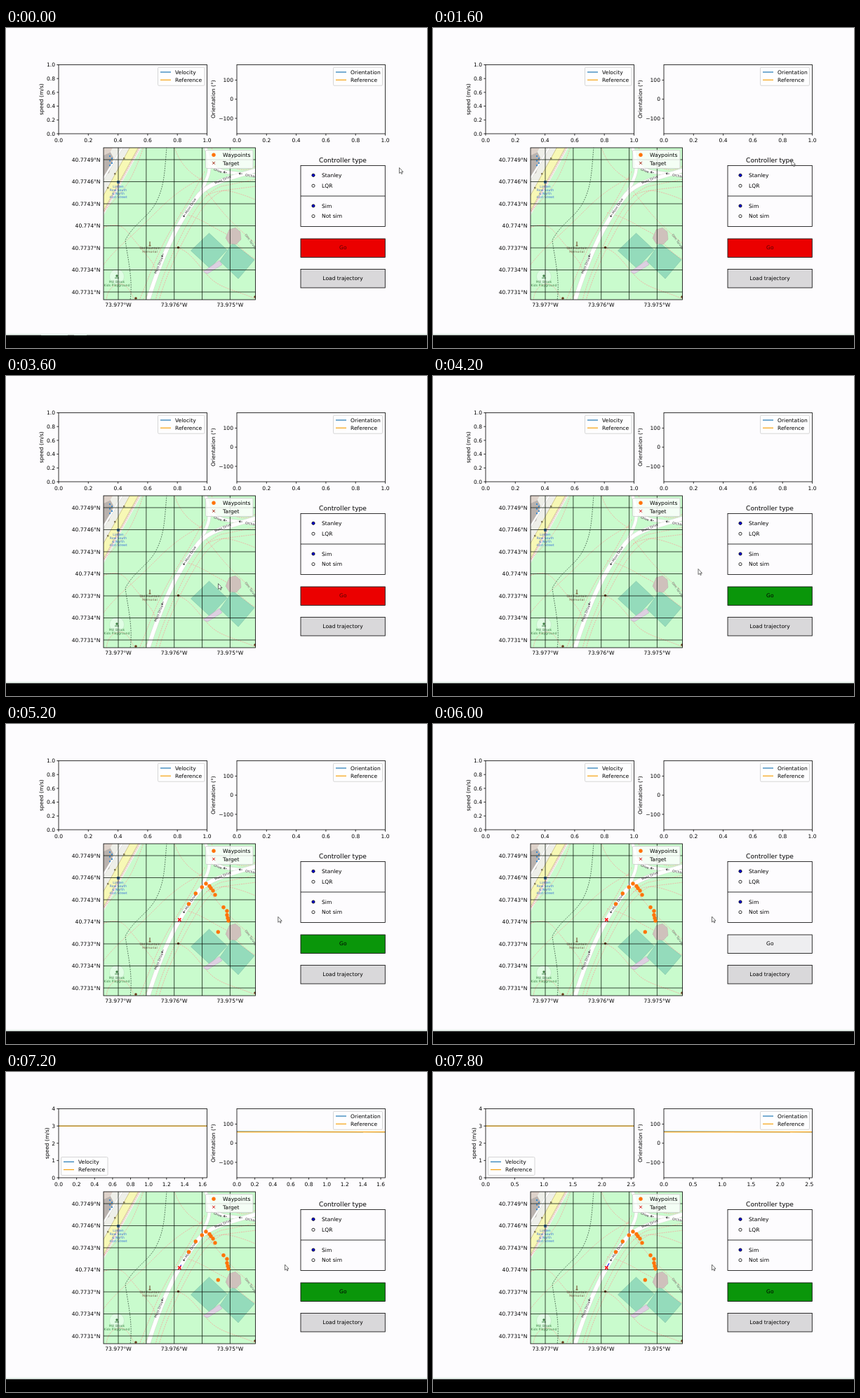
An HTML page that plays this animation: 600x457 px, repeating every 8 s.

```html
<!DOCTYPE html>
<html lang="en">
<head>
<meta charset="utf-8">
<title>Controller dashboard</title>
<style>
html, body { margin: 0; width: 100%; height: 100%; overflow: hidden; background: #fdfcfe; }
svg { display: block; width: 600px; height: 457px; font: 7.57px "DejaVu Sans", sans-serif; }
.tiny { font-size: 4.6px; }
.path { fill: none; stroke: #f4a39b; stroke-width: .8; stroke-dasharray: 2 1.2; }
.road { fill: none; stroke-linejoin: round; }
</style>
</head>
<body>
<svg id="stage" viewBox="0 0 600 457"></svg>
<script>
const LOOP = 8000, STEP = 200;
const BLUE = '#1f77b4', ORANGE = '#f5a00c', WAYPOINT = '#ff740a';
const TOP = 52.5, BOTTOM = 151, WIDTH = 211.5;

const range = (n, f) => Array.from({ length: n }, (_, i) => f(i)).join('');
const line = (x1, y1, x2, y2, stroke = '#000', w = .8) =>
  `<path d="M${x1} ${y1}L${x2} ${y2}" stroke="${stroke}" stroke-width="${w}"/>`;
const box = (x, y, w, h, fill = 'none', extra = 'stroke="#000" stroke-width=".8"') =>
  `<rect x="${x}" y="${y}" width="${w}" height="${h}" fill="${fill}" ${extra}/>`;
const dot = (x, y, r, fill, extra = '') => `<circle cx="${x}" cy="${y}" r="${r}" fill="${fill}" ${extra}/>`;
const text = (x, y, s, anchor = 'start', extra = '') =>
  `<text x="${x}" y="${y}" dy=".365em" text-anchor="${anchor}" ${extra}>${s}</text>`;
const turned = (x, y, angle, s, extra = '') =>
  text(0, 0, s, 'middle', `transform="translate(${x} ${y}) rotate(${angle})" ${extra}`);
const cross = (x, y, r, stroke, w) =>
  `<path d="M${x - r} ${y - r}l${2 * r} ${2 * r}m0 ${-2 * r}l${-2 * r} ${2 * r}" stroke="${stroke}" stroke-width="${w}"/>`;
const legendBox = (x, y, w) =>
  box(x, y, w, 26, '#fff', 'fill-opacity=".8" stroke="#ccc" stroke-width=".8" rx="1.5"');
const legend = (x, y, w, name) => legendBox(x, y, w) +
  line(x + 3.5, y + 6.8, x + 18.5, y + 6.8, BLUE, 1.2) + text(x + 24.5, y + 6.8, name) +
  line(x + 3.5, y + 18, x + 18.5, y + 18, ORANGE, 1.2) + text(x + 24.5, y + 18, 'Reference');

function tickStep(max) {
  const raw = max / 9 - 1e-9, power = 10 ** Math.floor(Math.log10(raw));
  return [1, 2, 2.5, 5, 10].map(k => k * power).find(s => s >= raw);
}

function axes(x, xMax, yTicks) {
  const step = tickStep(xMax);
  const digits = step < .1 - 1e-6 || Math.abs(step - .25) < 1e-6 ? 2 : 1;
  return range(Math.floor(xMax / step + 1e-6) + 1, i => {
    const tx = x + i * step / xMax * WIDTH;
    return line(tx, BOTTOM, tx, BOTTOM + 2.7) + text(tx, 159.8, (i * step).toFixed(digits), 'middle');
  }) + yTicks.map(([y, s]) => line(x - 2.7, y, x, y) + text(x - 5, y, s, 'end')).join('') +
    box(x, TOP, WIDTH, BOTTOM - TOP);
}

const curve = (d, attrs) => `<path d="${d}" ${attrs}/>`;
const roadway = (d, w) => curve(d, `class="road" stroke="#d5d5d0" stroke-width="${w + .9}"`) +
  curve(d, `class="road" stroke="#fff" stroke-width="${w}"`);

function mapView() {
  const drive = 'M202 390C211 361 218 341 230 314S255 264 275 238C287 223 311 216 357 203';
  const branch = 'M284 170C290 184 292 201 287 213S281 229 276 237';
  const cross1 = 'M289 192Q300 204 316 206T357 211';
  const paths = [
    'M190 389C206 350 218 315 240 280S270 229 283 205', 'M213 389C221 359 235 326 251 294S283 235 307 226T357 216',
    'M218 389C227 358 240 328 257 296S287 243 309 232T357 226', 'M139 285Q160 276 172 290T205 330T194 389',
    'M139 262Q164 237 174 221T196 170', 'M139 338Q153 320 171 304T219 258T281 214',
    'M248 264C275 270 290 282 308 291S335 320 357 331', 'M248 315C265 322 276 342 291 357S329 375 356 387',
    'M282 228Q305 260 321 276T357 309', 'M285 240Q304 229 323 234T357 246',
    'M240 170Q250 202 281 218', 'M293 171Q299 188 321 198T357 196',
    'M143 389Q145 370 159 366T183 389'
  ];
  const brown = '#6b3b1d', roadName = 'class="tiny" fill="#333"';
  const blueName = 'class="tiny" fill="#3b73d8"', greenName = 'class="tiny" fill="#43834a"';
  return `<clipPath id="mapClip"><rect x="139" y="171" width="216.5" height="217"/></clipPath>
  <g clip-path="url(#mapClip)">` + box(139, 171, 217, 217, '#c9fbcd', '') +
    curve('M139 171H193L139 268Z', 'fill="#eeefe9"') +
    curve('M139 181l9 -5 5 9 -6 22 -8 4Z', 'fill="#b9b2ae"') +
    curve('M139 171h13l-4 7 -9 4Z', 'fill="#ded2ca"') +
    roadway('M139 215L166 170', 2) +
    curve('M134 259L184 168', 'class="road" stroke="#b8ab70" stroke-width="11"') +
    curve('M134 259L184 168', 'class="road" stroke="#f7f8b5" stroke-width="10"') +
    curve('M140 262L190 171', 'class="road" stroke="#f3b9ad" stroke-width="1.2" stroke-dasharray="2 1"') +
    range(5, i => box(147 + i % 2 * 3, 182 + i * 3.3, 2, 2, '#398bd0', '')) +
    [[167, 185], [154, 207], [144, 227]].map(([x, y]) => box(x, y, 2.5, 2.5, '#8d8460', '')).join('') +
    paths.map(d => curve(d, 'class="path"')).join('') +
    curve('M229 170C226 205 226 224 215 247S183 278 170 303C174 332 181 359 177 389',
      'fill="none" stroke="#53745a" stroke-width="1" stroke-dasharray="1.8 1.5"') +
    roadway(branch, 4) + roadway(cross1, 4) + roadway(drive, 5.5) +
    curve('M289.5 293L315 317 290.5 343 263.5 318Z', 'fill="#94dbbb" stroke="#79bba0" stroke-width=".5"') +
    curve('M323 307L354 331 331 358 305 333Z', 'fill="#94dbbb" stroke="#79bba0" stroke-width=".5"') +
    curve('M281 348L304 332 308 338 287 351Z', 'fill="#ddcfe1" stroke="#b9a6bd" stroke-width=".5"') +
    curve('M318 288l9 -3 7 6 1 11 -7 7 -10 -1 -5 -8Z', 'fill="#cfc1bc" stroke="#aa9d97" stroke-width=".6" stroke-dasharray="1 1"') +
    dot(158, 355, 10.5, '#e0fde4', 'stroke="#b2dfb8" stroke-width=".5"') +
    dot(158, 354, 1.7, '#43834a') + line(155, 357, 161, 357, '#43834a', 1) +
    box(158, 218, 4, 4, '#467bb0', '') +
    line(205, 305, 205, 311, brown, 1) + line(203.5, 311, 206.5, 311, brown, 1) +
    [[245.5, 313.5], [185, 386], [355, 384]].map(([x, y]) => dot(x, y, 1.8, brown)).join('') +
    ['Linden', 'Row South', '&amp; North', '41st Street'].map((s, i) => text(160, 226 + 5 * i, s, 'middle', blueName)).join('') +
    text(205, 314.5, 'Old Fountain', 'middle', `class="tiny" fill="#795b48"`) +
    text(205, 319.5, 'Memorial', 'middle', `class="tiny" fill="#795b48"`) +
    text(158, 362, 'Mill Brook', 'middle', greenName) + text(158, 367, 'Kids Playground', 'middle', greenName) +
    turned(263, 254, -57, 'Moss Drive', roadName) + turned(217.5, 339, -67, 'Moss Drive', roadName) +
    turned(309, 216.5, -23, 'Moss Drive', roadName) + turned(302, 203.5, 23, 'Drive', roadName) +
    turned(350, 211, 9, 'Orchard', roadName) + turned(349, 305, 54, 'Olm Tarvey', 'class="tiny" fill="#666"') +
    [[254, 268, -60], [223, 325, -65], [312, 206, 10], [334, 208, 5]].map(([x, y, a]) =>
      `<path transform="translate(${x} ${y}) rotate(${a})" d="M3 0H-2l1.5 -1.3v2.6l-1.5 -1.3" stroke="#555" stroke-width=".7"/>`).join('') +
    range(5, i => line(160 + i * 39.85, 171, 160 + i * 39.85, 388, '#0a120a', .75)) +
    range(7, i => line(139, 188 + i * 31.5, 356, 188 + i * 31.5, '#0a120a', .75)) + '</g>' +
    box(139, 171, 216.5, 217) +
    range(7, i => text(134.5, 188 + i * 31.5, `${+(40.7749 - i * .0003).toFixed(4)}°N`, 'end')) +
    range(3, i => text(160 + i * 79.7, 395.5, `${(73.977 - i * .001).toFixed(3)}°W`, 'middle'));
}

function controls() {
  const radios = [['Stanley', 210.3, true], ['LQR', 225.3, false], ['Sim', 254, true], ['Not sim', 268.7, false]];
  return text(480, 188.5, 'Controller type', 'middle', 'font-size="9.08"') +
    box(420, 196.5, 120.3, 87) + line(420, 240, 540.3, 240) +
    radios.map(([s, y, on]) => dot(438, y, 2.1, on ? '#0000e0' : '#fff', 'stroke="#000" stroke-width=".8"') + text(450, y, s)).join('') +
    box(420, 344.5, 120.3, 26.5, '#d9d8da') + text(480, 357.5, 'Load trajectory', 'middle');
}

const waypoints = [[302.3, 297], [317, 281], [316, 277], [315, 272.7], [315, 267], [310, 261.8], [298, 244],
  [295, 238], [292, 234.5], [290, 231.5], [285, 228], [279.3, 233], [270.3, 242], [260.5, 257]];
const cursorKeys = [[0, 560.5, 199.5], [1200, 560.5, 199.5], [1600, 511, 189], [2400, 416, 238], [3400, 302.5, 296.5],
  [3600, 302.5, 296.5], [4000, 378, 275.5], [5000, 378, 275.5], [5400, 397.5, 275], [LOOP, 397.5, 275]];

function cursor(t) {
  const i = cursorKeys.findIndex(k => k[0] > t), [t0, x0, y0] = cursorKeys[i - 1], [t1, x1, y1] = cursorKeys[i];
  const p = (t - t0) / (t1 - t0);
  return `<path transform="translate(${x0 + (x1 - x0) * p} ${y0 + (y1 - y0) * p})"
    d="M0 0V8L1.9 6.4 3.2 9 4.4 8.4 3.2 6H5.5Z" fill="#fff" stroke="#333" stroke-width=".7"/>`;
}

function charts(elapsed) {
  const running = elapsed > 0, xMax = running ? elapsed : 1, right = 75 + WIDTH;
  const speedTicks = Array.from({ length: running ? 5 : 6 }, (_, i, n = running ? 4 : 5) =>
    [BOTTOM - i / n * (BOTTOM - TOP), running ? i : (i / n).toFixed(1)]);
  const angleTicks = [[74.4, '100'], [101.7, '0'], [129, '−100']];
  const traces = running ? line(75, 77.1, right, 77.1, BLUE, 1.2) + line(75, 77.1, right, 77.1, ORANGE, 1.2) +
    line(329, 85.1, 329 + WIDTH, 85.6, BLUE, 1.2) + line(329, 85.6, 329 + WIDTH, 85.6, ORANGE, 1.2) : '';
  return traces + axes(75, xMax, speedTicks) + axes(329, xMax, angleTicks) +
    turned(running ? 58 : 50, 101.7, -90, 'speed (m/s)') + turned(295.5, 101.7, -90, 'Orientation (°)') +
    (running ? legend(78.5, 121.5, 66.5, 'Velocity') : legend(216.5, 56.2, 66.5, 'Velocity')) +
    legend(466.5, 56.2, 70, 'Orientation');
}

function route(t, elapsed) {
  if (t < 4400) return '';
  const run = Math.max(0, elapsed) * 2.85;
  return waypoints.map(([x, y]) => dot(x, y, 2.7, WAYPOINT)).join('') +
    (run ? line(247.3, 279.5, 247.3 + run * .51, 279.5 - run * .86, '#1515e0', 1.2) : '') +
    cross(247.3, 279.5, 2.1, '#f00', 1.5);
}

function scene(t) {
  const elapsed = t < 6200 ? 0 : 1.5 * (t - 6100) / 1000;
  const goColor = t < 3800 ? '#eb0000' : t >= 5400 && t < 6200 ? '#eeeef0' : '#0a960a';
  return charts(elapsed) + route(t, elapsed) + legendBox(284.5, 174.5, 67.5) +
    dot(296, 181.2, 2.7, WAYPOINT) + text(309, 181.2, 'Waypoints') +
    cross(296, 192.8, 1.9, t < 3800 ? '#a52a1a' : '#d81a1a', 1) + text(309, 192.8, 'Target') +
    box(420, 301, 120.3, 26.5, goColor) +
    text(480.3, 313.7, 'Go', 'middle', t < 3800 ? 'fill="#500"' : '') +
    (t < STEP ? line(50, 438.5, 88, 438.5, '#d5eadf', 1) + line(97, 438.5, 115, 438.5, '#d5eadf', 1) : '') +
    cursor(t);
}

const stage = document.getElementById('stage');
stage.innerHTML = box(0, 0, 600, 457, '#fdfcfe', '') + box(0, 436.5, 600, 2, '#e6f3ec', '') +
  box(0, 438.7, 600, 19, '#000', '') + mapView() + controls() + '<g id="live"></g>';
const live = document.getElementById('live');

let shown = -1;
function frame() {
  const t = Math.floor(performance.now() % LOOP / STEP) * STEP;
  if (t !== shown) live.innerHTML = scene(shown = t);
  requestAnimationFrame(frame);
}
frame();
</script>
</body>
</html>
```
